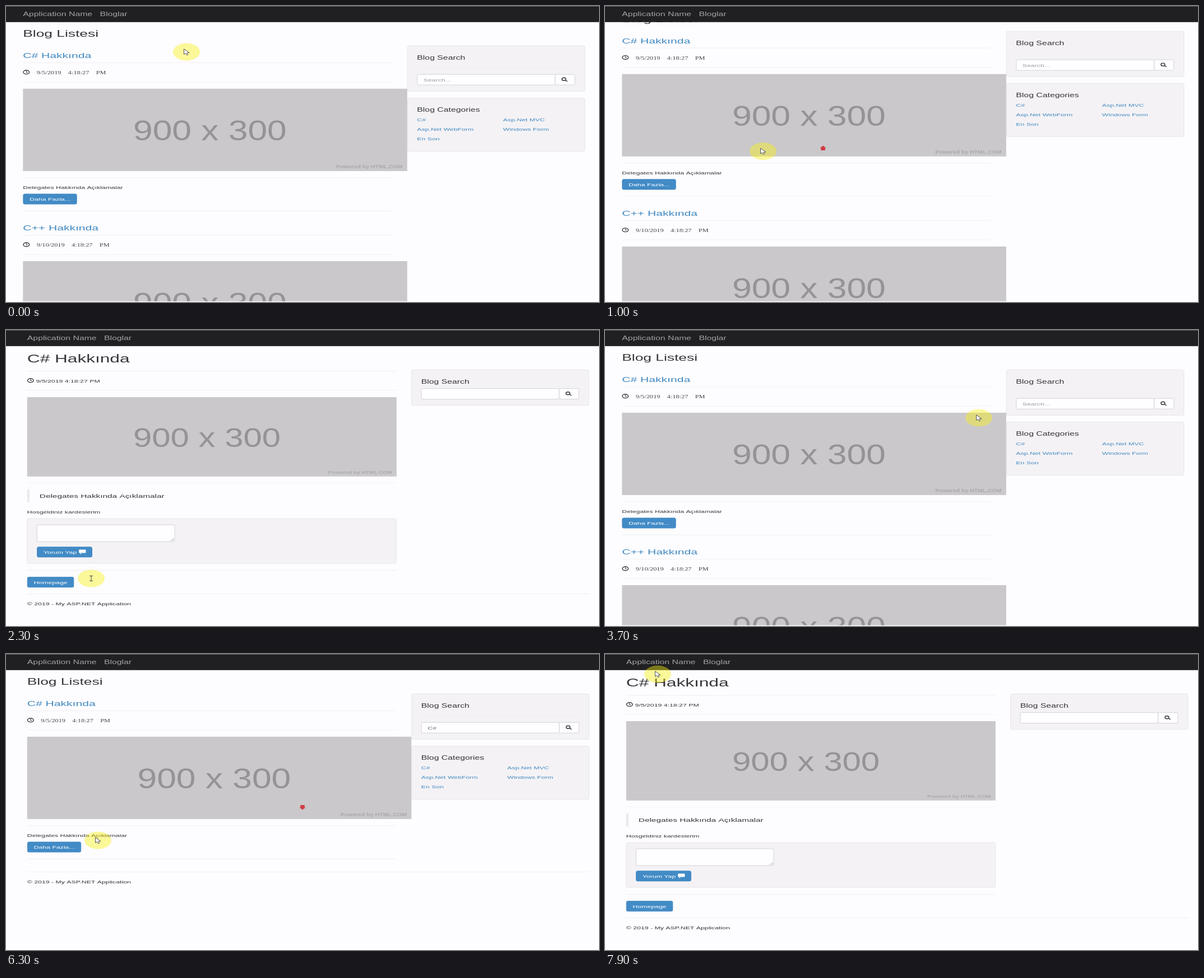
Animation, 1058 px wide and 529 px high, one loop 8 s. Source, as an HTML page with a canvas:

```html
<!DOCTYPE html>
<html lang="tr">
<head>
<meta charset="utf-8">
<title>Blog</title>
<style>
html, body { margin: 0; width: 100%; height: 100%; overflow: hidden; background: #fdfcfe; }
canvas { display: block; }
</style>
</head>
<body>
<canvas id="stage" width="1058" height="529"></canvas>
<script>
const ctx = document.getElementById('stage').getContext('2d');
const LOOP = 8000, STEP = 100;
// The page is shown wider than tall: one scale for all type.
const SX = 0.878, SY = 0.5646;
const SANS = '"Liberation Sans", Arial, sans-serif';
const SERIF = '"Liberation Serif", "Times New Roman", serif';
const PAPER = '#fdfcfe', FIELD = '#fefdff', INK = '#363537', LINK = '#4189c1', BLUE = '#428bc6';
const EDGE = '#cccbcd';

// Where the pointer goes, and when it gets there
const spot = (time, x, y) => ({ time, x, y });
const more = time => spot(time, 85, 345);
const STOPS = [
  spot(0, 322, 82), spot(200, 338, 88), spot(600, 375, 191), spot(800, 389, 254),
  spot(1200, 175, 265), more(1800), spot(2300, 152, 444), spot(2900, 80, 450),
  spot(3700, 667, 157), spot(4100, 90, 380), spot(4500, 860, 132), spot(5000, 998, 132),
  spot(5900, 529, 274), spot(6300, 164, 333), spot(6700, 940, 200), more(7200),
  spot(7900, 94, 36)
];
const WHEEL_DOWN = [200, 5900], WHEEL_UP = [800], MARK_TIME = 500;

const ramp = (t, a, b) => Math.min(1, Math.max(0, (t - a) / (b - a)));
const ease = k => k * k * (3 - 2 * k);
const scrollAt = t => 78.5 * (ramp(t, 200, 400) - ramp(t, 800, 1100));

function pointerAt(t) {
  const i = Math.max(1, STOPS.findIndex(s => s.time >= t));
  const a = STOPS[i - 1], b = STOPS[i];
  const k = ease(ramp(t, a.time, b.time));
  return [a.x + (b.x - a.x) * k, a.y + (b.y - a.y) * k];
}

function text(s, x, y, size = 14, color = INK, font = SANS) {
  ctx.save();
  ctx.translate(x, y);
  ctx.scale(SX, SY);
  ctx.font = `${size}px ${font}`;
  ctx.fillStyle = color;
  ctx.fillText(s, 0, 0);
  ctx.restore();
}

function rect(x, y, w, h, color) {
  ctx.fillStyle = color;
  ctx.fillRect(x, y, w, h);
}

function box(x, y, w, h, fill, line, r = 2.5) {
  ctx.beginPath();
  ctx.roundRect(x, y, w, h, r);
  ctx.fillStyle = fill;
  ctx.fill();
  ctx.strokeStyle = line;
  ctx.lineWidth = 0.8;
  ctx.stroke();
}

function line(color, width, ...segments) {
  ctx.strokeStyle = color;
  ctx.lineWidth = width;
  ctx.beginPath();
  for (const [x1, y1, x2, y2] of segments) {
    ctx.moveTo(x1, y1);
    ctx.lineTo(x2, y2);
  }
  ctx.stroke();
}

function ring(x, y, rx, ry) {
  ctx.strokeStyle = INK;
  ctx.lineWidth = 1.4;
  ctx.beginPath();
  ctx.ellipse(x, y, rx, ry, 0, 0, 7);
  ctx.stroke();
}

const rule = (x, y, w) => rect(x, y, w, 0.8, '#eeedef');
const well = (x, y, w, h) => box(x, y, w, h, '#f4f2f5', '#e2e1e3');

function button(s, x, y, w) {
  box(x, y, w, 18.2, BLUE, '#3d84c0');
  text(s, x + 11.3, y + 12.4, 14, '#fff');
}

function clock(x, y) {
  ring(x, y, 5.3, 3.4);
  line(INK, 1, [x, y - 2.2, x, y + 0.5], [x, y + 0.3, x + 2.5, y + 0.3]);
}

function picture(x, y, w, h) {
  rect(x, y, w, h, '#cac8cb');
  ctx.save();
  ctx.translate(x, y);
  ctx.scale(w / 900, h / 300);
  // The lettering inside the picture is a little narrower.
  const narrow = 0.81;
  ctx.scale(narrow, 1);
  ctx.font = `101px ${SANS}`;
  ctx.fillStyle = '#959396';
  ctx.textAlign = 'center';
  ctx.fillText('900 x 300', 438 / narrow, 187.5);
  ctx.font = `bold 17px ${SANS}`;
  ctx.textAlign = 'right';
  ctx.fillStyle = '#aba9ac';
  ctx.fillText('Powered by HTML.COM', 889 / narrow, 290);
  ctx.restore();
}

function nav(shift) {
  rect(0, 0, 1058, 28.8, '#201f21');
  rect(0, 0, 1058, 0.7, '#858486');
  text('Application Name', 30.3 + shift, 17.6, 18, '#a3a2a4');
  text('Bloglar', 167.4 + shift, 17.6, 18, '#a3a2a4');
}

function search(x, y, value, color, focus) {
  box(x, y, 246, 19, FIELD, focus ? '#66afe9' : EDGE, 2);
  box(x + 246, y, 35, 19, FIELD, EDGE, 2);
  text(value, x + 11, y + 12.6, 14, color);
  ring(x + 261.6, y + 8.6, 3.5, 2.5);
  line(INK, 1.4, [x + 264.4, y + 10.4, x + 267.8, y + 12.6]);
}

function post(x, y, title, date) {
  text(title, x, y + 92.7, 24, LINK);
  rule(x, y + 100.8, 658);
  clock(x + 6, y + 118.2);
  let left = x + 24.5;
  for (const word of date.split(' ')) {
    text(word, left, y + 122, 14, '#444345', SERIF);
    ctx.font = `14px ${SERIF}`;
    left += (ctx.measureText(word).width + 14) * SX;
  }
  rule(x, y + 135.5, 658);
  picture(x, y + 147.8, 685.5, 147.2);
  rule(x, y + 306.5, 658);
  text('Delegates Hakkında Açıklamalar', x, y + 326.8);
  button('Daha Fazla...', x + 0.5, y + 335.9, 95.4);
  rule(x, y + 365.8, 658);
}

function sidebar(x, value, focus) {
  const left = x + 703;
  well(x + 686, 71.3, 316.5, 81);
  text('Blog Search', left, 96.3, 18);
  rule(left, 109.8, 281);
  search(left + 0.5, 122.2, value || 'Search...', value ? '#666567' : '#9b9a9c', focus);
  well(x + 686, 164.5, 316.5, 95);
  text('Blog Categories', left, 189.2, 18);
  ['C#', 'Asp.Net MVC', 'Asp.Net WebForm', 'Windows Form', 'En Son'].forEach((s, i) =>
    text(s, left + (i % 2) * 153.5, 206 + (i >> 1) * 17, 14, LINK));
}

function footer(y) {
  rule(38, y, 1002);
  text('© 2019 - My ASP.NET Application', 37.8, y + 20.6);
}

function list(scroll, value, focus, found) {
  const shift = found ? 7.5 : 0, x = 30.3 + shift;
  ctx.save();
  ctx.translate(0, -scroll);
  text('Blog Listesi', x, 55, 30);
  post(x, 0, 'C# Hakkında', '9/5/2019 4:18:27 PM');
  if (found) footer(389.2);
  else post(x, 308.2, 'C++ Hakkında', '9/10/2019 4:18:27 PM');
  sidebar(x, value, focus);
  ctx.restore();
  nav(shift);
}

function bubble(x, y) {
  ctx.fillStyle = '#fff';
  ctx.beginPath();
  ctx.roundRect(x, y, 12.4, 5.8, 1);
  ctx.moveTo(x + 2, y + 5.4);
  ctx.lineTo(x + 2.6, y + 8.4);
  ctx.lineTo(x + 6.4, y + 5.4);
  ctx.fill();
}

function detail() {
  const x = 37.8;
  nav(7.5);
  text('C# Hakkında', x, 58, 36);
  for (const y of [73, 107.3, 272.6, 429.3]) rule(x, y, 659);
  clock(x + 6, 90.2);
  text('9/5/2019 4:18:27 PM', 53.5, 93.8);
  picture(x, 120, 659, 141.8);
  rect(x, 285, 4.2, 23, '#eae9eb');
  text('Delegates Hakkında Açıklamalar', 59.8, 299.5, 17.5);
  text('Hosgeldiniz kardeslerim', x, 328);
  well(x, 337, 658.7, 80);
  box(55.3, 348.2, 245.7, 30, FIELD, EDGE, 2);
  line('#9a999b', 0.7, [293, 377, 300, 372.5], [296.5, 377, 300, 374.8]);
  button('Yorum Yap', 55.5, 387.7, 98);
  bubble(130, 392.6);
  button('Homepage', 38.2, 441.6, 82.6);
  footer(471.2);
  well(723.5, 71.3, 316.5, 63.4);
  text('Blog Search', 740.7, 96.3, 18);
  search(741, 104.6, '', INK, false);
}

function pointer([x, y], beam) {
  ctx.fillStyle = 'rgba(248,242,20,.43)';
  ctx.beginPath();
  ctx.ellipse(x, y, 24, 15.5, 0, 0, 7);
  ctx.fill();
  if (beam) {
    const bar = dy => [x - 3, y + dy, x + 3, y + dy];
    line('#4a494b', 1, bar(-4.5), bar(4.5), [x, y - 4.5, x, y + 4.5]);
    return;
  }
  ctx.save();
  ctx.translate(x - 4.5, y - 5.2);
  const arrow = new Path2D('M0 0V9.5L3 7.6 5 11 7 10.3 5.2 7 9.5 6.8Z');
  ctx.fillStyle = '#fff';
  ctx.fill(arrow);
  ctx.strokeStyle = '#545355';
  ctx.lineWidth = 1;
  ctx.stroke(arrow);
  ctx.restore();
}

function wheelMark([x, y], dir) {
  rect(x - 3.8, y - 4 * (dir > 0), 7.6, 4, '#d03d44');
  ctx.beginPath();
  ctx.moveTo(x - 5.5, y);
  ctx.lineTo(x + 5.5, y);
  ctx.lineTo(x, y + 4.5 * dir);
  ctx.fill();
}

function draw(t) {
  const within = (a, b) => t >= a && t < b;
  rect(0, 0, 1058, 529, PAPER);
  if (within(1900, 3000) || t >= 7300) detail();
  else {
    const found = t >= 5100;
    const value = 'C#'.slice(0, Math.max(0, (t - 4600) / 100));
    list(scrollAt(t), value, within(4500, 5000), found);
  }
  rect(0, 527.7, 1058, 1.3, PAPER);
  const marks = (times, dir) => times
    .filter(s => within(s, s + MARK_TIME))
    .forEach(s => wheelMark(pointerAt(s), dir));
  marks(WHEEL_DOWN, 1);
  marks(WHEEL_UP, -1);
  pointer(pointerAt(t), within(2200, 2500) || within(4500, 4900));
}

function tick(now) {
  draw(Math.floor((now % LOOP) / STEP) * STEP);
  requestAnimationFrame(tick);
}
requestAnimationFrame(tick);
</script>
</body>
</html>
```
